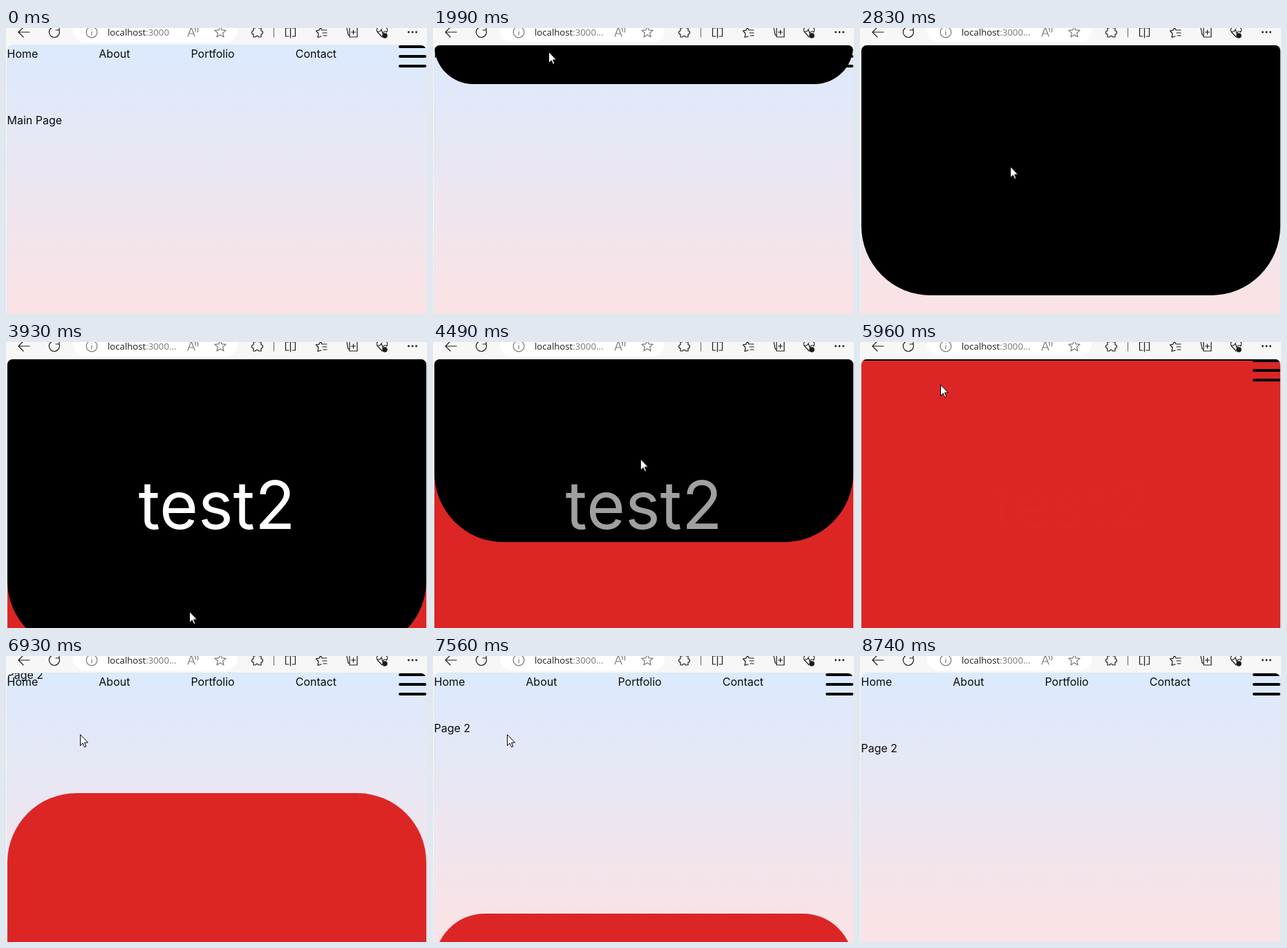
An HTML page that plays this animation: 609x413 px, repeating every 9530 ms.

```html
<!DOCTYPE html>
<html lang="en">
<head>
<meta charset="utf-8">
<title>Page transition</title>
<style>
  html, body { margin: 0; width: 100%; height: 100%; overflow: hidden; }
  body { position: relative; background: #f7f7f7; font: 16px/24px Inter, sans-serif; color: #0b0c10; }
  .bar, .cursor { position: absolute; left: 0; top: 0; overflow: visible; }
  .bar { fill: none; stroke: #1b1b1b; stroke-width: 1.2; stroke-linecap: round; stroke-linejoin: round; }
  .bar .soft { stroke: #767676; }
  .url { font: 13.2px "Open Sans", "Noto Sans", sans-serif; fill: #1b1b1b; stroke: none; }
  .url tspan { fill: #767676; }
  .page, .edge { position: absolute; left: 2px; top: 25px; width: 606px; height: 420px; border-radius: 8px 8px 0 0; }
  .page { overflow: hidden; background: linear-gradient(#dbeafe, #fee2e2); }
  .edge { box-shadow: 0 0 0 1px #e3e6ea; }
  .page > * { position: absolute; }
  .nav { display: flex; gap: 88px; left: -.5px; top: 0; }
  .body { left: -.5px; top: 96px; white-space: nowrap; }
  .panel { left: 0; width: 100%; height: 0; }
  .drop { top: 0; background: #000; border-radius: 0 0 100px 100px; }
  .rise { bottom: 0; background: #dc2626; border-radius: 100px 100px 0 0; }
  .title { inset: 162px 0 auto; text-align: center; font-size: 96px; line-height: 1; color: #fff; opacity: 0; }
  .menu { right: 0; top: 0; width: 40px; display: grid; gap: 10px; }
  .menu i { height: 4px; border-radius: 2px; background: #000; }
</style>
</head>
<body>
<svg class="bar" width="609" height="25">
  <rect x="97" y="-16" width="238" height="37" rx="18" fill="#fff" stroke="none"/>
  <text class="url" x="147" y="11">localhost<tspan>:3000</tspan><tspan class="dots" fill-opacity="0">...</tspan></text>
</svg>

<div class="edge"></div>
<div class="page">
  <div class="nav"><span>Home</span><span>About</span><span>Portfolio</span><span>Contact</span></div>
  <div class="body main">Main Page</div>
  <div class="body next">Page 2</div>
  <div class="panel rise"></div>
  <div class="panel drop cover"></div>
  <div class="panel drop reveal"></div>
  <div class="title">test2</div>
  <div class="menu"><i></i><i></i><i></i></div>
</div>

<svg class="cursor" width="14" height="20">
  <path d="M.5 .5v16l3.7-3.5 2.5 5.5 2.2-1-2.4-5.500h5z" fill="#fff" stroke="#000"/>
</svg>

<script>
const LOOP = 9530, VH = 420;
const OUT = 'cubic-bezier(0, 0, .58, 1)';
const LEAVE = 1863, MOUNT = 3930, ENTER = 3978, STEP = 2098;
const SUNK = ENTER + 2 * STEP;

const px = n => n + 'px';
const shift = (x, y) => `translate(${x}px, ${y}px)`;

// toolbar icons, each drawn around its own centre
function icon(x, d, style = '') {
  const mark = `<path class="${style}" transform="translate(${x} 6)" d="${d}"/>`;
  document.querySelector('.bar').insertAdjacentHTML('beforeend', mark);
}
const ring = r => `M${-r} 0a${r} ${r} 0 1 1 0 .01z`;
const star = r => 'M' + Array.from({ length: 10 }, (_, i) => {
  const a = i * Math.PI / 5, k = i % 2 ? r * .45 : r;
  return [k * Math.sin(a), -k * Math.cos(a)].map(n => n.toFixed(1));
}).join('L') + 'z';

icon(26, 'M8 0H-8m7-7l-7 7 7 7');
icon(70, 'M6.500-3.500A7.500 7.500 0 1 1 2-7.200M7-8v5h-5');
icon(124, ring(7.8) + 'M0-1v5M0-4v.2', 'soft');
icon(268, 'M-5 6L0-7 5 6M-3 2h6M5-6q2 2 1 5M8-8q3 4 1 8', 'soft');
icon(310, star(8.5), 'soft');
icon(363, 'M-5-6h3a2.400 2.400 0 0 1 5 0h3v4a2.400 2.400 0 0 1 0 5v4h-3.500a2.400 2.400 0 0 0-4.500 0h-3v-4a2.500 2.500 0 1 1 0-5z');
icon(387.5, 'M0-7v14', 'soft');
icon(411.5, 'M-2.500-6h-4.500v12h4.500M2.500-6h4.500v12h-4.500M0-8v16');
icon(456, 'M0 6l-5 1.500 1-5.500-3.500-4 4.500-.8 2-4.200 2 4h7M2 1h6M3 5h5');
icon(502, 'M-5-7h11v14h-11zM.5-3v6m-3-3h6M-8-7l-1 1 2 10 2 1');
icon(544, 'M0 7l-6.500-7a4 4 0 0 1 6.500-6 4 4 0 0 1 6.500 6M-6-1h3l2-3 2 6 2-3h4');
icon(548, 'M0 5h0" stroke-width="7.600');
icon(588, 'M-5.500 0h0m5.500 0h0m5.500 0h0" stroke-width="2.800');

// steps: [time, value, easing to the next step]
function play(selector, prop, steps) {
  const all = [[0, steps[0][1]], ...steps, [LOOP, steps.at(-1)[1]]];
  const frames = all.map(([t, value, easing = 'linear']) => ({ offset: t / LOOP, [prop]: value, easing }));
  document.querySelector(selector).animate(frames, { duration: LOOP, iterations: Infinity });
}
const cut = (selector, t, from, to, prop = 'opacity') => play(selector, prop, [[t, from], [t, to]]);

// appears with the new page, then eases out to its end value
const settle = (selector, prop, hidden, from, to, start) =>
  play(selector, prop, [[MOUNT, hidden], [MOUNT, from], [start, from, OUT], [start + STEP, to]]);

cut('.dots', 1590, 0, 1, 'fillOpacity');
cut('.main', LEAVE, 1, 0);

// black drops over the old page
cut('.cover', MOUNT, 1, 0);
play('.cover', 'height', [[LEAVE, px(0), OUT], [LEAVE + 2215, px(1.4 * VH)]]);

// black lifts and the title fades, then red sinks while the new page arrives
settle('.reveal', 'height', px(0), px(VH), px(0), ENTER);
settle('.title', 'opacity', 0, 1, 0, ENTER);
settle('.rise', 'height', px(0), px(1.4 * VH), px(0), ENTER + STEP);
play('.next', 'transform', [[ENTER, shift(0, -2 * VH), OUT], [SUNK, shift(0, 0)]]);

// cursor stops: arrive, depart, x, y; it glides straight between them
const stops = [
  [130, 560, 154, 171], [740, 740, 126, 90], [930, 2060, 167, 34], [2830, 2830, 217, 199],
  [3200, 3600, 255, 420], [3670, 3900, 263, 401], [4490, 4490, 300, 169], [4980, 5680, 180, -25],
  [5960, 5960, 116, 61], [6300, 7770, 107, 113], [8120, 8400, 115, 420], [8520, 8640, 121, 351], [8730, LOOP, 294, 430]
];
cut('.cursor', 130, 0, 1);
play('.cursor', 'transform', stops.flatMap(([a, b, x, y]) => [[a, shift(x, y)], [b, shift(x, y)]]));
</script>
</body>
</html>
```
